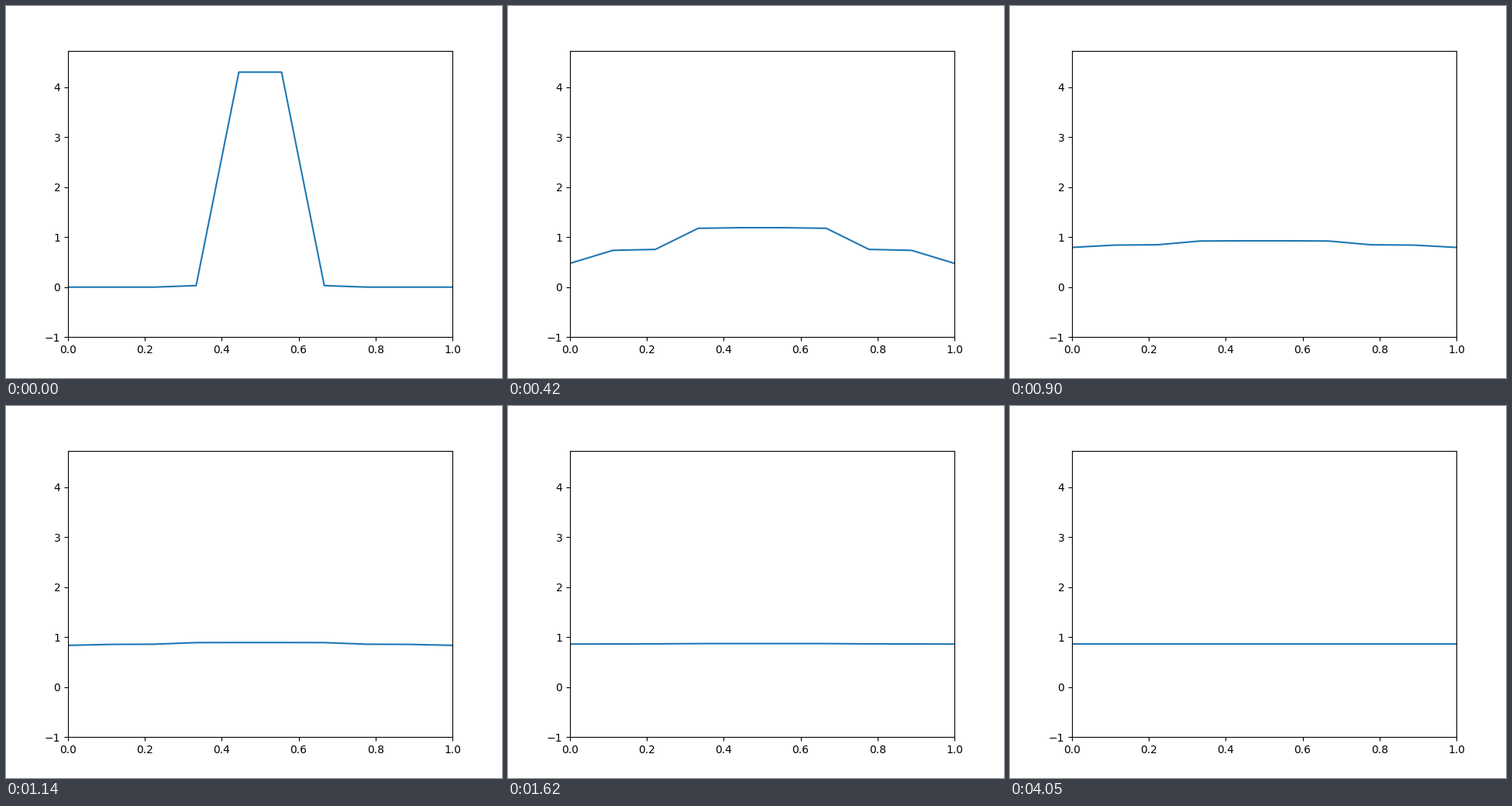
Recreate the animation shown at these times as a matplotlib script. Size 640 px wide and 480 px high, loop 8 s.

```python
import numpy as np
import matplotlib.pyplot as plt
from matplotlib.animation import FuncAnimation

LOOP_MS = 8000
TICK_MS = 20
STEP_MS = 60
LAST_STEP = 35       # beyond this the decay is no longer visible
FLAT_MS = 4040       # fully levelled out from here on
R = 0.498            # D * dt / dx**2, just inside the stability limit
MEAN, SIGMA = 0.5, 0.05


def diffuse(u):
    """One explicit heat-equation step with insulated ends."""
    p = np.pad(u, 1, mode="edge")
    return u + R * (p[:-2] - 2 * u + p[2:])


x = np.linspace(0, 1, 10)
u0 = np.exp(-0.5 * ((x - MEAN) / SIGMA) ** 2) / (SIGMA * np.sqrt(2 * np.pi))

states = [u0]
for _ in range(LAST_STEP):
    states.append(diffuse(states[-1]))
flat = np.full_like(x, u0.mean())

plt.rcParams["font.family"] = "DejaVu Sans"
fig, ax = plt.subplots(figsize=(6.4, 4.8), dpi=100)
ax.set_xlim(0, 1)
ax.set_ylim(-1, 1.1 * u0.max())
line, = ax.plot(x, u0, color="#1f77b4", lw=1.5)


def update(i):
    ms = i * TICK_MS
    if ms >= FLAT_MS:
        line.set_ydata(flat)
    else:
        line.set_ydata(states[min(ms // STEP_MS, LAST_STEP)])
    return line,


anim = FuncAnimation(fig, update, frames=LOOP_MS // TICK_MS,
                     interval=TICK_MS, repeat=True, repeat_delay=0)
plt.show()
```
